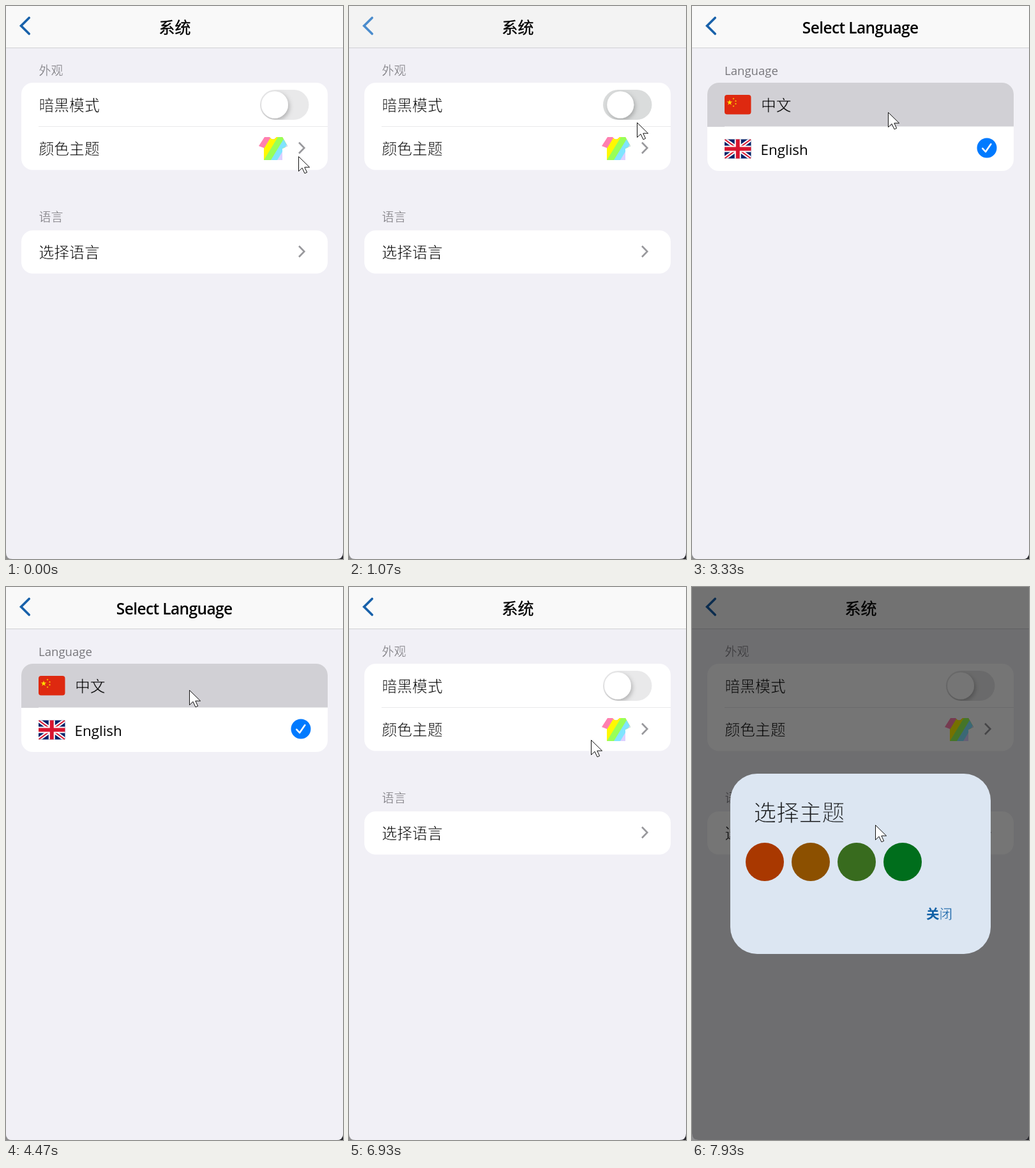
An HTML page that plays this animation: 528x865 px, repeating every 8000 ms.

```html
<!DOCTYPE html>
<html lang="zh-CN">
<head>
<meta charset="utf-8">
<title>Settings</title>
<style>
  html, body { margin: 0; width: 100%; height: 100%; overflow: hidden; }
  svg { display: block; width: 528px; height: 865px; --bg: #f1f0f6; --card: #fff; --ink: #000; --sub: #77767b; --rule: #e9e9eb; }
  svg.dark { --bg: #000; --card: #1c1c1e; --ink: #fff; --sub: #98989f; --rule: #38383a; }
  text { font-family: "Open Sans", "Noto Sans CJK SC", "Noto Sans CJK", sans-serif; fill: var(--ink); }
  .zh { font-family: "Noto Sans CJK SC", "Noto Sans CJK", sans-serif; font-weight: 300; }
  /* A thin outline in the backdrop colour lightens the strokes. */
  .row { font-size: 23.8px; stroke: var(--card); stroke-width: .6px; }
  .label { font-size: 19px; fill: var(--sub); }
  .zh.label { stroke: var(--bg); stroke-width: .35px; }
  .title { font-size: 25px; text-anchor: middle; fill: #000; }
  .title.zh { font-weight: 400; stroke: #000; stroke-width: .35px; }
  .title.en { font-size: 24.5px; font-weight: 600; letter-spacing: -.6px; }
  .prompt { font-size: 35.7px; fill: #1a1c1e; stroke: #dce6f2; stroke-width: 1px; }
  .bg { fill: var(--bg); }
  .card { fill: var(--card); }
  .rule { fill: var(--rule); }
  .line { fill: none; stroke-linecap: round; stroke-linejoin: round; }
  .more { stroke: #98989c; stroke-width: 2.6; stroke-linecap: butt; stroke-linejoin: miter; }
</style>
</head>
<body>
<svg id="stage" viewBox="0 0 528 865">
  <defs>
    <clipPath id="window"><path d="M0 0H528V855Q528 865 518 865H10Q0 865 0 855Z"/></clipPath>
    <clipPath id="langCard"><rect x="24" y="120" width="480" height="138" rx="18"/></clipPath>
    <clipPath id="track"><rect x="398" y="131" width="76.5" height="47" rx="23.5"/></clipPath>
    <clipPath id="shirt"><path d="M405 205H413Q418 212 424 205H433L441 219L433 223V241H404V222L396 219Z"/></clipPath>
    <clipPath id="flagCn"><rect x="51" y="139" width="41.5" height="30.5" rx="4"/></clipPath>
    <clipPath id="flagUk"><rect x="51" y="208.5" width="41.5" height="30" rx="1"/></clipPath>
    <filter id="soft" x="-40%" y="-40%" width="180%" height="180%">
      <feDropShadow dx="2" dy="3" stdDeviation="3.5" flood-opacity=".25"/>
    </filter>
  </defs>
  <rect width="264" height="865" fill="#8d8d8f"/>
  <rect x="264" width="264" height="865" fill="#26262b"/>
  <g clip-path="url(#window)">
    <g id="sysPage">
      <rect class="bg" width="528" height="865"/>
      <text class="zh label" x="51.5" y="107.5">外观</text>
      <rect class="card" x="24" y="120" width="480" height="136.5" rx="18"/>
      <rect class="rule" x="51" y="188" width="453" height="1"/>
      <text class="zh row" x="51.5" y="163.5">暗黑模式</text>
      <text class="zh row" x="51.5" y="231.5">颜色主题</text>
      <rect id="trackFill" x="398" y="131" width="76.5" height="47" rx="23.5"/>
      <g clip-path="url(#track)"><circle id="knob" cy="154.5" r="21" fill="#fff" filter="url(#soft)"/></g>
      <g id="stripes" clip-path="url(#shirt)"></g>
      <path class="line more" d="M459 213.5L467.3 222L459 230.5"/>
      <text class="zh label" x="51.5" y="337">语言</text>
      <rect class="card" x="24" y="351" width="480" height="67.5" rx="18"/>
      <text class="zh row" x="51.5" y="393.5">选择语言</text>
      <path class="line more" d="M459 375.5L467.3 384L459 392.5"/>
    </g>
    <rect id="scrim" width="528" height="865"/>
    <g id="langPage">
      <rect class="bg" width="528" height="865"/>
      <text id="langLabelZh" class="zh label" x="51.5" y="106">语言</text>
      <text id="langLabelEn" class="label" x="51" y="108" style="font-size:18.6px">Language</text>
      <g clip-path="url(#langCard)">
        <rect class="card" x="24" y="120" width="480" height="138"/>
        <rect id="press" x="24" width="480" height="69" fill="#d1d0d5"/>
        <rect class="rule" x="51" y="188" width="453" height="1"/>
      </g>
      <g clip-path="url(#flagCn)">
        <rect x="51" y="139" width="42" height="31" fill="#de2910"/>
        <g id="stars" fill="#ffde00"></g>
      </g>
      <g clip-path="url(#flagUk)" fill="none">
        <rect x="51" y="208" width="42" height="31" fill="#012169"/>
        <path d="M51 208.5L92.5 238.5M92.5 208.5L51 238.5" stroke="#fff" stroke-width="6"/>
        <path d="M51 208.5L92.5 238.5M92.5 208.5L51 238.5" stroke="#d8152f" stroke-width="2"/>
        <path d="M71.75 208V239M51 223.5H93" stroke="#fff" stroke-width="10"/>
        <path d="M71.75 208V239M51 223.5H93" stroke="#d8152f" stroke-width="6"/>
      </g>
      <text id="langZh" class="zh row" x="108" y="163.5">中文</text>
      <text x="107.5" y="233" font-size="22.4">English</text>
      <g id="check">
        <circle cx="462" cy="153" r="15.5" fill="#007aff"/>
        <path class="line" d="M455.3 153.8L460 159L468.3 147" stroke="#fff" stroke-width="2.6"/>
      </g>
    </g>
    <rect id="bar" width="528" height="65"/>
    <rect y="65" width="528" height="1" fill="#d1d1d4"/>
    <path id="back" fill="none" stroke-linecap="round" d="M36.2 18.5L23.6 31L36.2 43.5" stroke-width="3.7"/>
    <text id="sysTitle" class="zh title" y="42.5">系统</text>
    <text id="langTitleZh" class="zh title" y="41.5">选择语言</text>
    <text id="langTitleEn" class="title en" y="43">Select Language</text>
    <g id="dialog">
      <rect width="528" height="865" opacity=".54"/>
      <rect x="60" y="292" width="408" height="282" rx="42" fill="#dce6f2"/>
      <text class="zh prompt" x="96.5" y="365.5">选择主题</text>
      <g id="swatches"></g>
      <text class="zh" x="367" y="519" font-size="20.5" style="fill:#1160a6"><tspan font-weight="700">关</tspan><tspan stroke="#dce6f2" stroke-width=".4">闭</tspan></text>
    </g>
  </g>
  <path id="cursor" d="M.5 .5V23.5L6 18.3L10 26.8L13.6 25.2L9.8 17.2H17.6Z" fill="#fff" stroke="#111"/>
</svg>
<script>
const LOOP = 8000;
const $ = id => document.getElementById(id);
const set = (id, attrs) => { for (const k in attrs) $(id).setAttribute(k, attrs[k]); };
const clamp = v => Math.min(1, Math.max(0, v));
const ramp = (t, a, b) => clamp((t - a) / (b - a));
const mix = (a, b, p) => a + (b - a) * p;
const tint = (a, b, p) => `rgb(${a.map((v, i) => Math.round(mix(v, b[i], p)))})`;
const within = (t, a, b) => t >= a && t < b;
const easeOut = p => 1 - (1 - p) ** 3;

function bezier(x1, y1, x2, y2) {
  const at = (a, b, s) => 3 * a * s * (1 - s) ** 2 + 3 * b * s * s * (1 - s) + s ** 3;
  return x => {
    let lo = 0, hi = 1;
    for (let i = 0; i < 24; i++) {
      const mid = (lo + hi) / 2;
      if (at(x1, x2, mid) < x) lo = mid; else hi = mid;
    }
    return x >= 1 ? 1 : at(y1, y2, lo);
  };
}

// Two-part zoom curve: slow pickup, long settle.
const pickup = bezier(.05, 0, .1333, .06), settle = bezier(.2083, .82, .25, 1);
const zoomCurve = p => p < 1 / 6 ? .4 * pickup(p * 6) : .4 + .6 * settle((p - 1 / 6) * 1.2);

// Pointer stops: time, x, y.
const stops = [
  [0, 458, 235], [70, 458, 235], [500, 447, 158], [870, 448, 160], [1000, 448, 161],
  [1070, 451, 182], [1400, 395, 300], [1750, 305, 378], [1870, 302, 382],
  [2270, 306, 221], [2780, 306, 221], [3070, 307, 166], [3450, 307, 166],
  [3800, 296, 221], [4050, 294, 223], [4400, 287, 161], [4580, 287, 161],
  [4930, 180, 120], [5280, 30, 34], [5500, 30, 34], [5780, 34, 41],
  [6050, 85, 230], [6280, 130, 335], [6600, 214, 245], [6650, 214, 245],
  [6930, 379, 239], [7200, 414, 229], [7440, 414, 229], [7900, 287, 372], [8000, 287, 372]
];
const slope = (i, k) => (stops[i + 1][k] - stops[i][k]) / (stops[i + 1][0] - stops[i][0]);
function tangent(i, k) {
  if (i === 0 || i === stops.length - 1) return 0;
  const a = slope(i - 1, k), b = slope(i, k);
  return a * b <= 0 ? 0 : 2 * a * b / (a + b);
}
function pointer(t, k) {
  let i = 0;
  while (i < stops.length - 2 && t >= stops[i + 1][0]) i++;
  const a = stops[i], b = stops[i + 1], d = b[0] - a[0], s = clamp((t - a[0]) / d);
  return mix(a[k], b[k], s * s * (3 - 2 * s)) +
    d * s * (1 - s) * ((1 - s) * tangent(i, k) - s * tangent(i + 1, k));
}

const zoom = s => `translate(264 432.5) scale(${s}) translate(-264 -432.5)`;

function star(cx, cy, r) {
  const pts = Array.from({ length: 10 }, (_, i) => {
    const a = i * Math.PI / 5 - Math.PI / 2, q = i % 2 ? r * .4 : r;
    return `${cx + q * Math.cos(a)},${cy + q * Math.sin(a)}`;
  });
  return `<polygon points="${pts.join(' ')}"/>`;
}

$('stars').innerHTML = star(59, 151, 4.6) +
  [[65, 145], [68.5, 148.5], [68.5, 153], [65, 156.5]].map(([x, y]) => star(x, y, 1.6)).join('');
$('stripes').innerHTML = [[380, '#ff80b0'], [415, '#fff800'], [426, '#98ff58'], [437, '#80e4ff'], [447, '#dcd0ff']]
  .map(([x, c]) => `<path d="M${x} 205H480V241H${x - 22}Z" fill="${c}"/>`).join('');
$('swatches').innerHTML = ['#a93800', '#8c5000', '#386b1e', '#006e1c']
  .map((c, i) => `<circle cx="${114 + 72 * i}" cy="430" r="30" fill="${c}"/>`).join('');

const PUSH = 1850, POP = 5380, SPAN = 300;

function render(t) {
  // Dark mode on, then off again.
  const dark = ramp(t, 510, 690) * (1 - ramp(t, 970, 1140));
  const on = easeOut(ramp(t, 500, 700)) * (1 - easeOut(ramp(t, 970, 1180)));
  $('stage').classList.toggle('dark', within(t, 570, 1000));
  set('bar', { fill: tint([249, 249, 249], [234, 234, 234], dark) });
  set('back', { stroke: tint([24, 97, 170], [150, 202, 255], dark) });
  set('knob', { cx: mix(421, 451.5, on) });
  set('trackFill', { fill: tint([233, 233, 234], [125, 140, 135], on) });

  // Page zoom in and out.
  const push = ramp(t, PUSH, PUSH + SPAN), pop = ramp(t, POP, POP + SPAN);
  const zin = zoomCurve(push), zout = zoomCurve(pop);
  const leaving = t >= POP;
  const moving = push > 0 && push < 1;
  set('sysPage', { transform: zoom(leaving ? mix(1.1, 1, zout) : moving ? mix(1, 1.05, zin) : 1) });
  set('langPage', {
    transform: zoom(leaving ? mix(1, .9, zout) : mix(.85, 1, zin)),
    opacity: leaving ? 1 - ramp(pop, .0825, .2075) : ramp(push, .125, .25)
  });
  set('scrim', { opacity: moving ? .6 * ramp(push, .2075, .4175) : 0 });

  // Titles slide and cross-fade in the bar.
  const p = easeOut(push) * (1 - easeOut(pop));
  set('sysTitle', { x: mix(264.5, 130, p), opacity: clamp(1 - p * 1.6) });
  const en = within(t, 2600, 3470) || within(t, 4070, 4600);
  const titleFade = clamp(p * 1.6 - .6), titleX = mix(460, 264.5, p);
  set('langTitleZh', { x: titleX, opacity: en ? 0 : titleFade });
  set('langTitleEn', { x: 263.7, opacity: en ? titleFade : 0 });
  set('langLabelZh', { opacity: en ? 0 : 1 });
  set('langLabelEn', { opacity: en ? 1 : 0 });
  set('check', { transform: `translate(0 ${en ? 69 : 0})` });

  const first = within(t, 3330, 3470) || within(t, 4470, 4600);
  const second = within(t, 2470, 2600) || within(t, 3930, 4070);
  set('press', { y: second ? 189 : 120, opacity: first || second ? 1 : 0 });
  $('langZh').style.stroke = first ? '#d1d0d5' : '';

  set('dialog', { opacity: easeOut(ramp(t, 7440, 7620)) });
  set('cursor', { transform: `translate(${Math.round(pointer(t, 1))} ${Math.round(pointer(t, 2))})` });
}

const start = performance.now();
function tick() {
  render((performance.now() - start) % LOOP);
  requestAnimationFrame(tick);
}
tick();
</script>
</body>
</html>
```
